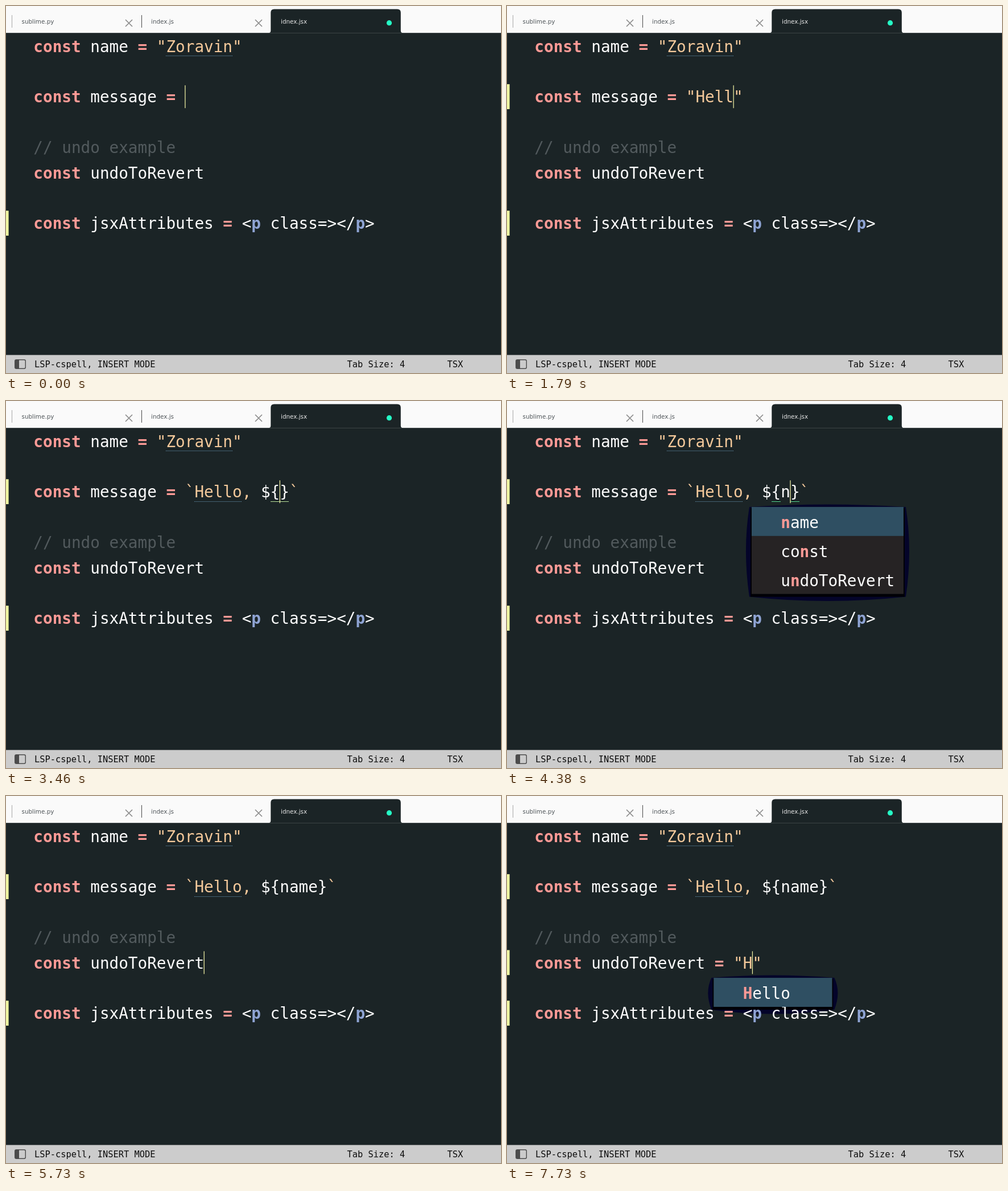
Recreate the animation shown at these times as an HTML page with a canvas. Size 870 by 644 pixels, loop 8000 ms.

```html
<!DOCTYPE html>
<html lang="en">
<head>
<meta charset="utf-8">
<title>Editor typing</title>
<style>
  html, body { margin: 0; width: 100%; height: 100%; overflow: hidden; background: #1b2426; }
  canvas { display: block; }
</style>
</head>
<body>
<canvas id="stage" width="870" height="644"></canvas>
<script>
const ctx = document.getElementById('stage').getContext('2d');
const LOOP = 8000;
const CHAR = 16.65, LEFT = 48.35, ROW = 44.4, TOP = 48.4;
const MONO = '"DejaVu Sans Mono", monospace';
const CODE = `27.66px ${MONO}`, BOLD = `bold ${CODE}`;
const C = {
  bg: '#1b2426', text: '#fdfdfd', pink: '#fe9a96', string: '#f4c99b',
  comment: '#525a5d', tag: '#8fa4d4', caret: '#f2f2a4', gutter: '#f0f6a2',
  dots: '#6a9ab8'
};

// Each step: start time, message value, tail of the undo line, caret row and column.
const HELLO = '`Hello, ${name}`';
const STEPS = [
  [-310, '', '', 3, 16],
  [520, '""', '', 3, 17],
  [1370, '"H"', '', 3, 18],
  [1510, '"He"', '', 3, 19],
  [1650, '"Hel"', '', 3, 20],
  [1790, '"Hell"', '', 3, 21],
  [1970, '"Hello"', '', 3, 22],
  [2230, '"Hello,"', '', 3, 23],
  [2410, '"Hello, "', '', 3, 24],
  [2940, '"Hello, $"', '', 3, 25],
  [3430, '`Hello, ${}`', '', 3, 26],
  [4330, '`Hello, ${n}`', '', 3, 27],
  [4580, HELLO, '', 3, 30],
  [4940, HELLO, '', 3, 31],
  [5430, HELLO, '', 4, 0],
  [5560, HELLO, '', 5, 15],
  [5730, HELLO, '', 6, 18],
  [6110, HELLO, ' ', 6, 19],
  [6280, HELLO, ' =', 6, 20],
  [6420, HELLO, ' = ', 6, 21],
  [7320, HELLO, ' = ""', 6, 22],
  [7680, HELLO, ' = "H"', 6, 23]
];

// Completion items carry the index of their highlighted letter.
const POPUPS = [
  { from: 2990, to: 3220, row: 3, col: 25, width: 284, items: [
    ['name'], ['class'], ['const'], ['Hello'], ['message'], ['undoToRevert'], ['jsxAttributes']] },
  { from: 4380, to: 4580, row: 3, col: 26, width: 267, items: [
    ['name', 0], ['const', 2], ['undoToRevert', 1]] },
  { from: 7730, to: 8000, row: 6, col: 22, width: 208, items: [['Hello', 0]] }
];
const ITEM = 50.9, INDENT = 51.3;

const colX = col => LEFT + col * CHAR;
const rowTop = row => TOP + (row - 1) * ROW;

function rect(x, y, w, h, color) {
  ctx.fillStyle = color;
  ctx.fillRect(x, y, w, h);
}

function write(str, x, y, color, font) {
  ctx.font = font;
  ctx.fillStyle = color;
  ctx.fillText(str, x, y);
}

function drawString(str, col, y) {
  for (const part of str.split(/(\$\{\w*\})/)) {
    const color = part.startsWith('${') ? C.text : C.string;
    [...part].forEach((letter, i) => write(letter, colX(col + i), y, color, CODE));
    col += part.length;
  }
}

function drawCode(row, code) {
  const y = rowTop(row) + 32.1;
  const tokens = /\/\/.*|const|(?<= )=|"[^"]*"|`[^`]*`|(?<=[<\/])p|[^\s]/g;
  for (const { 0: token, index } of code.matchAll(tokens)) {
    const x = colX(index);
    if (/^["`]/.test(token)) drawString(token, index, y);
    else if (token.startsWith('//')) write(token, x, y, C.comment, CODE);
    else if (token === 'const' || (token === '=' && code[index - 1] === ' ')) write(token, x, y, C.pink, BOLD);
    else if (token === 'p' && /[<\/]/.test(code[index - 1])) write(token, x, y, C.tag, BOLD);
    else write(token, x, y, C.text, CODE);
  }
}

const underlineY = row => Math.round(rowTop(row) + 38.8);

function dotted(row, col, length) {
  const end = colX(col + length);
  for (let x = Math.floor(colX(col)); x < end; x += 2) rect(x, underlineY(row), 1, 1, C.dots);
}

function drawGutter(row) {
  rect(0, rowTop(row), 4.6, 43.8, C.gutter);
}

function popupBox(p) {
  return { x: colX(p.col) - INDENT, y: rowTop(p.row) + 48.7, w: p.width, h: p.items.length * ITEM };
}

function drawShadow(p) {
  const { x, y, w, h } = popupBox(p), mid = x + w / 2;
  ctx.fillStyle = '#04042a';
  ctx.beginPath();
  ctx.moveTo(x - 4, y);
  ctx.quadraticCurveTo(mid, y - 9, x + w + 4, y);
  ctx.quadraticCurveTo(x + w + 16, y + h / 2, x + w + 4, y + h + 5);
  ctx.quadraticCurveTo(mid, y + h + 20, x - 4, y + h + 5);
  ctx.quadraticCurveTo(x - 16, y + h / 2, x - 4, y);
  ctx.fill();
  rect(x - 2, y + 2, w + 4, h + 3, '#000006');
}

function drawPopup(p) {
  const { x, y, w, h } = popupBox(p);
  rect(x, y, w, h, '#262324');
  rect(x, y, w, ITEM, '#2f4f62');
  p.items.forEach(([word, hit], i) => {
    [...word].forEach((letter, k) => {
      const on = k === hit;
      write(letter, colX(p.col + k), y + 36.9 + i * ITEM, on ? C.pink : C.text, on ? BOLD : CODE);
    });
  });
}

function drawCross(x, y) {
  ctx.strokeStyle = '#8c8c8c';
  ctx.lineWidth = 1.7;
  ctx.beginPath();
  ctx.moveTo(x - 6, y - 6); ctx.lineTo(x + 6, y + 6);
  ctx.moveTo(x + 6, y - 6); ctx.lineTo(x - 6, y + 6);
  ctx.stroke();
}

function drawTabs() {
  const font = '10.4px "DejaVu Sans", sans-serif';
  const left = 465.3, right = 693.8, top = 5.5, bottom = 47.2;
  rect(0, 0, 870, bottom, '#fafafa');
  rect(10, 16, 1, 22, '#a8a8a8');
  rect(238, 16, 1, 22, '#484848');
  ctx.fillStyle = C.bg;
  ctx.beginPath();
  ctx.moveTo(left - 4, bottom);
  ctx.quadraticCurveTo(left, bottom, left, bottom - 4);
  ctx.lineTo(left, top + 6);
  ctx.quadraticCurveTo(left, top, left + 6, top);
  ctx.lineTo(right - 6, top);
  ctx.quadraticCurveTo(right, top, right, top + 6);
  ctx.lineTo(right, bottom - 4);
  ctx.quadraticCurveTo(right, bottom, right + 4, bottom);
  ctx.fill();
  write('sublime.py', 27.5, 31, '#50565a', font);
  write('index.js', 255, 31, '#50565a', font);
  write('idnex.jsx', 483, 31, '#e8e8e8', font);
  drawCross(216, 30);
  drawCross(444, 30);
  ctx.fillStyle = '#25fcc5';
  ctx.beginPath();
  ctx.arc(673.5, 29.7, 4.6, 0, Math.PI * 2);
  ctx.fill();
}

function drawStatus() {
  const font = `15.37px ${MONO}`;
  rect(0, 612.4, 870, 31.6, '#cccccc');
  ctx.strokeStyle = '#4c4c4c';
  ctx.lineWidth = 1.4;
  ctx.beginPath();
  ctx.roundRect(15.7, 620.7, 18.6, 15.6, 2.5);
  ctx.stroke();
  rect(16, 621, 7, 15, '#4c4c4c');
  write('LSP-cspell, INSERT MODE', 49.9, 634.4, '#0c0c0c', font);
  write('Tab Size: 4', 599.5, 634.4, '#0c0c0c', font);
  write('TSX', 775.5, 634.4, '#0c0c0c', font);
}

// The caret stays solid after each key, then fades away.
function drawCaret(age, row, col) {
  const fade = Math.min(1, Math.max(0, (age - 350) / 370));
  ctx.globalAlpha = (1 + Math.cos(Math.PI * fade)) / 2;
  rect(colX(col) - 0.5, rowTop(row) + 2, 1.25, 40, C.caret);
  ctx.globalAlpha = 1;
}

function draw(t) {
  const [start, message, tail, row, col] = STEPS.findLast(step => step[0] <= t);
  const popup = POPUPS.find(p => t >= p.from && t < p.to);

  rect(0, 0, 870, 644, C.bg);
  if (popup) drawShadow(popup);

  if (message) drawGutter(3);
  if (tail) drawGutter(6);
  drawGutter(8);

  drawCode(1, 'const name = "Zoravin"');
  drawCode(3, 'const message = ' + message);
  drawCode(5, '// undo example');
  drawCode(6, 'const undoToRevert' + tail);
  drawCode(8, 'const jsxAttributes = <p class=></p>');

  dotted(1, 14, 7);
  if (t >= 2880) dotted(3, 17, 5);
  if (t >= 3430 && t < 5430) {
    const color = t < 4330 ? '#b4dc96' : '#4fd08c';
    for (const brace of [25, 16 + message.indexOf('}')]) {
      rect(Math.round(colX(brace)), underlineY(3), 16, 1, color);
    }
  }

  drawCaret(t - start, row, col);
  if (popup) drawPopup(popup);
  drawTabs();
  drawStatus();
}

const begin = performance.now();
function tick() {
  draw((performance.now() - begin) % LOOP);
  requestAnimationFrame(tick);
}
tick();
</script>
</body>
</html>
```
